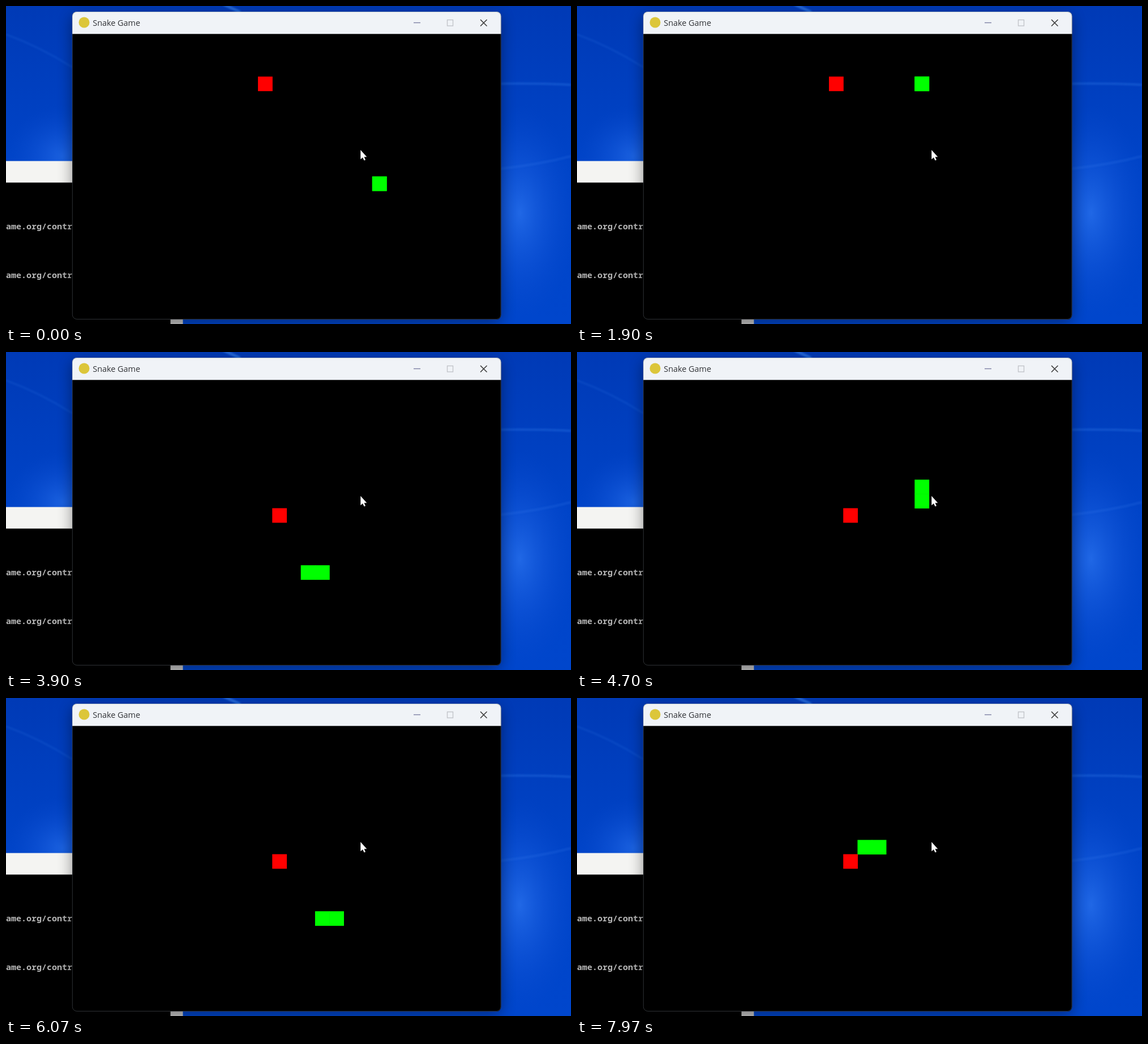
These frames come from a looping animation (998 by 561 pixels, 8000 ms). An HTML page:

```html
<!DOCTYPE html>
<html lang="en">
<head>
<meta charset="utf-8">
<title>Snake Game</title>
<style>
  html, body { margin: 0; width: 100%; height: 100%; overflow: hidden; background: #0040c0; }
  svg { display: block; width: 100%; height: 100%; }
  .title { font: 14.4px "Open Sans", "Noto Sans", sans-serif; fill: #303236; }
  .console { font: 600 15px "Noto Sans Mono", "DejaVu Sans Mono", monospace; fill: #b6b6b6; }
  .video { filter: url(#video); }
</style>
</head>
<body>
<svg viewBox="0 0 998 561" preserveAspectRatio="none">
  <defs>
    <linearGradient id="sky" x1="0" y1="0" x2="0" y2="1">
      <stop offset="0" stop-color="#003ab6"/>
      <stop offset=".5" stop-color="#0044c8"/>
      <stop offset="1" stop-color="#0046cc"/>
    </linearGradient>
    <radialGradient id="glow">
      <stop offset="0" stop-color="#2a72ee" stop-opacity=".85"/>
      <stop offset=".5" stop-color="#1c60e2" stop-opacity=".4"/>
      <stop offset="1" stop-color="#0c4cd0" stop-opacity="0"/>
    </radialGradient>
    <filter id="shadow" x="-10%" y="-10%" width="120%" height="120%">
      <feGaussianBlur stdDeviation="13"/>
    </filter>
    <filter id="streak" x="-20%" y="-40%" width="140%" height="180%">
      <feGaussianBlur stdDeviation="1.5"/>
    </filter>
    <filter id="video" color-interpolation-filters="sRGB">
      <feGaussianBlur stdDeviation=".4"/>
    </filter>
    <clipPath id="frame"><rect x="117" y="10" width="757.5" height="543" rx="8"/></clipPath>
  </defs>

  <!-- desktop -->
  <rect width="998" height="561" fill="url(#sky)"/>
  <ellipse cx="100" cy="265" rx="100" ry="90" fill="url(#glow)" opacity=".75"/>
  <ellipse cx="908" cy="365" rx="100" ry="190" fill="url(#glow)" opacity=".9"/>
  <g fill="none" stroke="#3c84f0" stroke-width="4" filter="url(#streak)">
    <path d="M0 50Q60 72 117 108" opacity=".13"/>
    <path d="M384 -3L414 11" stroke-width="5" opacity=".65"/>
    <path d="M874 137Q940 136 998 139" opacity=".3"/>
    <path d="M874 287Q940 280 998 265" opacity=".2"/>
  </g>

  <!-- console -->
  <rect y="311" width="312" height="250"/>
  <rect y="273.5" width="118" height="38" fill="#f4f4f2"/>
  <rect x="290.5" y="540" width="22" height="21" fill="#c8c8c8"/>
  <g class="video">
    <text class="console" x="0" y="394">ame.org/contr</text>
    <text class="console" x="0" y="480">ame.org/contr</text>
  </g>

  <!-- game window -->
  <rect x="117" y="18" width="757" height="540" rx="8" opacity=".42" filter="url(#shadow)"/>
  <g clip-path="url(#frame)">
    <rect x="117" y="10" width="758" height="543"/>
    <rect x="117" y="10" width="758" height="39.3" fill="#f0f3f7"/>
  </g>
  <rect x="117.3" y="10.5" width="756.7" height="542" rx="8" fill="none" stroke="#747a84" stroke-opacity=".4"/>
  <circle cx="138" cy="29" r="9.5" fill="#dcc63a"/>
  <g class="video">
    <text class="title" x="153.3" y="34.6">Snake Game</text>
    <g fill="none" stroke-width="1.4">
      <path d="M720 29.5H732" stroke="#7d80a4"/>
      <rect x="779.5" y="24.5" width="10" height="10.5" stroke="#c2c5ca"/>
      <path d="M838 24L849.5 35.5M849.5 24L838 35.5" stroke="#404040" stroke-width="1.6"/>
    </g>
  </g>

  <g class="video">
    <g id="board"></g>
    <path d="M626.3 254V270.5L630 267.2L632.6 272.6L635 271.5L632.6 266.2H637.3Z" fill="#fff"/>
  </g>
</svg>

<script>
  const LOOP = 8000, STEP = 100;
  const MEAL = 25;
  const START = [21, 10];
  const FOOD = [[13, 3], [14, 9]];
  const ROUTE = "R5 U7 L13 D10 R6 U6 L4 D6 R3 U3 L8 U2 R6";
  const MOVES = { R: [1, 0], L: [-1, 0], U: [0, -1], D: [0, 1] };

  const trail = [START];
  for (const leg of ROUTE.split(" ")) {
    const [dx, dy] = MOVES[leg[0]];
    for (let n = +leg.slice(1); n > 0; n--) {
      const [x, y] = trail[trail.length - 1];
      trail.push([x + dx, y + dy]);
    }
  }

  const board = document.getElementById("board");
  function makeCell(color) {
    const cell = document.createElementNS("http://www.w3.org/2000/svg", "rect");
    cell.setAttribute("width", 25.8);
    cell.setAttribute("height", 25.7);
    cell.setAttribute("fill", color);
    return board.appendChild(cell);
  }
  function place(cell, [col, row]) {
    cell.setAttribute("x", 117.2 + col * 25.22);
    cell.setAttribute("y", 49 + row * 25.17);
  }

  const food = makeCell("#f00");
  const tail = makeCell("#0f0");
  const head = makeCell("#0f0");

  function draw() {
    const step = Math.floor(performance.now() % LOOP / STEP);
    const fed = step >= MEAL;
    place(food, FOOD[fed ? 1 : 0]);
    place(head, trail[step]);
    place(tail, trail[fed ? step - 1 : step]);
    requestAnimationFrame(draw);
  }
  draw();
</script>
</body>
</html>
```
